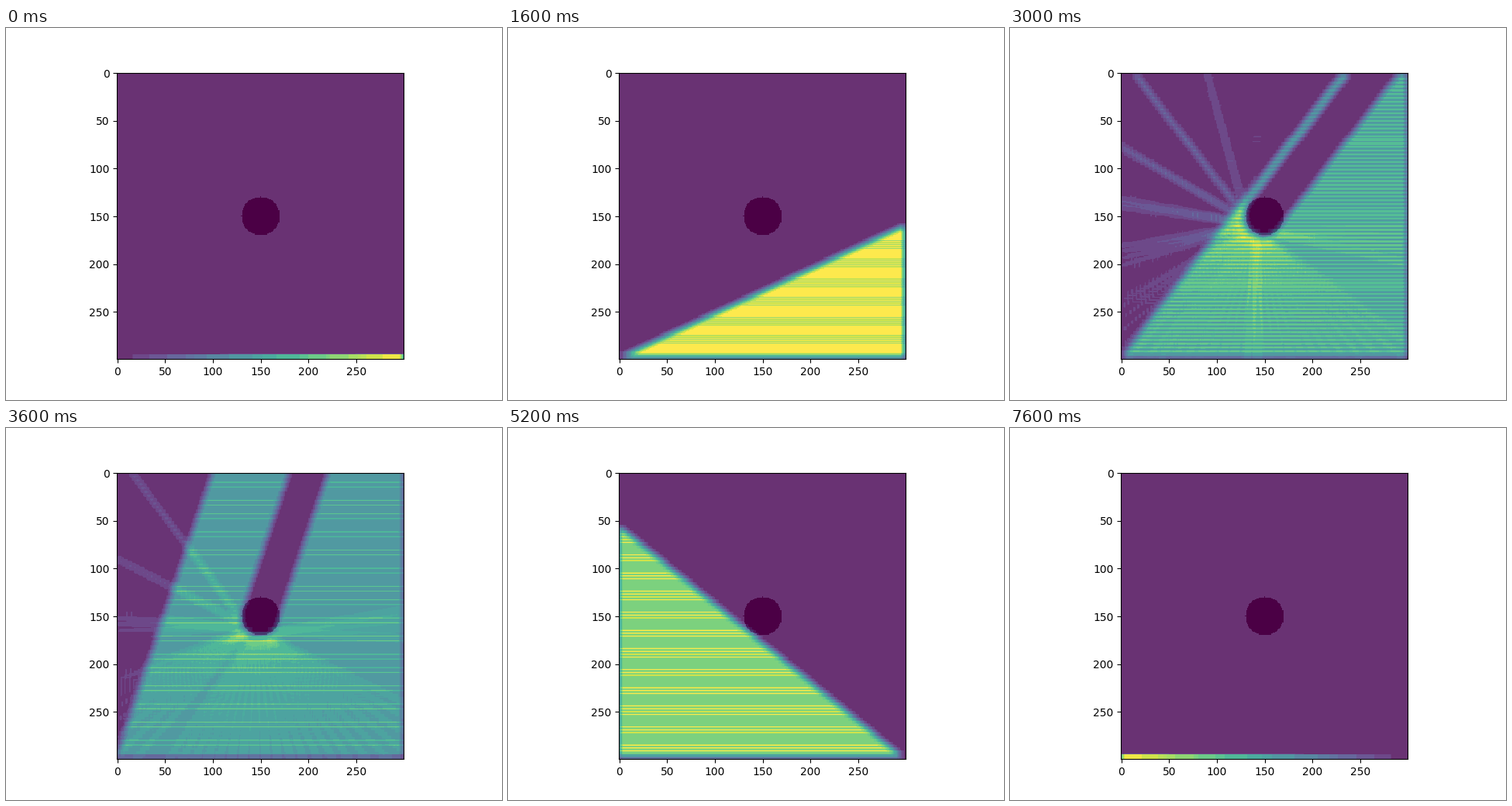
Animation, 640 px wide and 480 px high, one loop 7800 ms. Source, as a matplotlib script:

```python
import numpy as np
import matplotlib.pyplot as plt
from matplotlib.animation import FuncAnimation
from matplotlib.colors import ListedColormap

SIZE = 300           # field side, in cells
CENTER, RADIUS = 150, 20
STEP = 5             # distance a ray travels per move
HALF = 5             # every move lights a square of side 2 * HALF
FRAMES = 39
ALPHA = 0.8

VIRIDIS = plt.get_cmap("viridis")(np.arange(256))[:, :3]
PAPER = np.array(plt.get_cmap("Reds")(0.0)[:3])


def make_disc():
    yy, xx = np.mgrid[:SIZE, :SIZE] - CENTER
    return (xx**2 + yy**2 <= RADIUS**2) & (xx < RADIUS) & (yy < RADIUS)


DISC = make_disc()


def inside(pos):
    col, row = np.clip(np.floor(pos).astype(int), 0, SIZE - 1).T
    return DISC[row, col]


def box_sum(hits):
    """Sum over a sliding square of side 2 * HALF."""
    side = 2 * HALF
    total = np.zeros((hits.shape[0] + 1, hits.shape[1] + 1))
    total[1:, 1:] = hits.cumsum(0).cumsum(1)
    a, b = slice(0, SIZE), slice(side, SIZE + side)
    return total[b, b] - total[a, b] - total[b, a] + total[a, a]


def trace(frame):
    """Light parallel rays leaving the bottom edge and bouncing off the disc."""
    sweep = 2 * frame / (FRAMES - 1) - 1
    rise = 1 - abs(sweep)
    run = -np.sign(sweep) * np.sqrt(1 - rise**2)

    pos = np.column_stack([np.arange(SIZE), np.full(SIZE, SIZE)]).astype(float)
    way = np.tile([run, -rise], (SIZE, 1))
    hits = np.zeros((SIZE + 2 * HALF, SIZE + 2 * HALF))

    for _ in range(300):
        blocked = inside(pos + STEP * way)
        if blocked.any():
            normal = pos[blocked] - CENTER
            normal /= np.linalg.norm(normal, axis=1, keepdims=True)
            dot = (way[blocked] * normal).sum(1, keepdims=True)
            way[blocked] -= 2 * dot * normal
        pos = pos + STEP * way
        alive = ((pos >= 0) & (pos <= SIZE)).all(1)
        pos, way = pos[alive], way[alive]
        if not len(pos):
            break
        col, row = np.floor(pos).astype(int).T + HALF - 1
        np.add.at(hits, (row, col), 1)
    return box_sum(hits)


def stepped_cmap(light):
    """Viridis reduced to coarse colour cells, each the mean of what it holds."""
    level = (light / light.max() * 255.99).astype(int)
    weight = np.bincount(level.ravel(), minlength=256) + 1e-6
    rgb = (255 * (ALPHA * VIRIDIS + (1 - ALPHA) * PAPER)).astype(int)
    cell = (rgb[:, 0] >> 5) * 256 + (rgb[:, 1] >> 4) * 16 + (rgb[:, 2] >> 5)
    table = VIRIDIS.copy()
    for key in np.unique(cell):
        same = cell == key
        table[same] = np.average(VIRIDIS[same], axis=0, weights=weight[same])
    return ListedColormap(table)


lights = [trace(i) for i in range(FRAMES)]
cmaps = [stepped_cmap(light) for light in lights]

fig, ax = plt.subplots(figsize=(6.4, 4.8), dpi=100)
ax.imshow(DISC.astype(float), cmap="Reds", interpolation="nearest")
glow = ax.imshow(lights[0], cmap=cmaps[0], alpha=ALPHA)


def update(frame):
    glow.set_data(lights[frame])
    glow.set_cmap(cmaps[frame])
    glow.set_clim(0, lights[frame].max())
    return [glow]


anim = FuncAnimation(fig, update, frames=FRAMES, interval=200,
                     repeat=True, repeat_delay=0)
plt.show()
```
